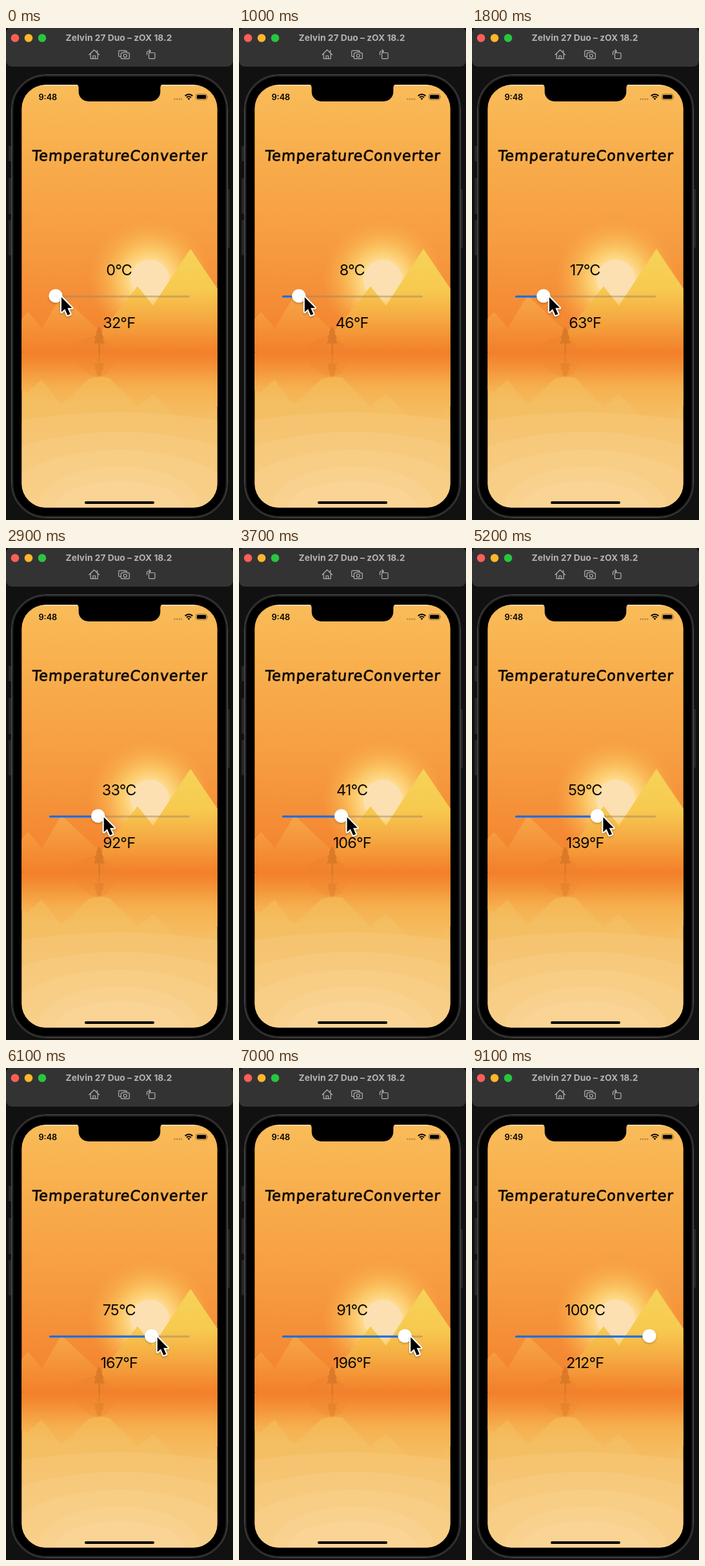
An HTML page for the animation above (9400 ms loop, 352 by 764 pixels).

```html
<!DOCTYPE html>
<html lang="en">
<head>
<meta charset="utf-8">
<title>Temperature converter</title>
<style>
  html, body { margin: 0; width: 100%; height: 100%; overflow: hidden; background: #111; }
  svg { display: block; width: 352px; height: 764px; }
  text { font-family: Inter, Roboto, sans-serif; }
  .window { font-size: 13.8px; font-weight: 700; fill: #b4b3b3; text-anchor: middle; }
  .icon { fill: none; stroke: #b2b1b1; stroke-width: 1.2; stroke-linejoin: round; stroke-linecap: round; }
  .clock { font-size: 12.7px; font-weight: 600; }
  .title { font: 22.3px "DejaVu Sans", sans-serif; letter-spacing: 1px; fill: #100b06; stroke: #100b06; stroke-width: .8; text-anchor: middle; }
  .reading { font-size: 23.5px; letter-spacing: -.9px; text-anchor: middle; fill: #0b0703; }
</style>
</head>
<body>
<svg viewBox="0 0 352 764">
  <defs>
    <linearGradient id="sky" gradientUnits="userSpaceOnUse" x1="0" y1="88" x2="0" y2="506">
      <stop offset="0" stop-color="#f9bc59"/>
      <stop offset=".25" stop-color="#f8ae4c"/>
      <stop offset=".6" stop-color="#f69b41"/>
      <stop offset="1" stop-color="#f3802b"/>
    </linearGradient>
    <linearGradient id="water" gradientUnits="userSpaceOnUse" x1="0" y1="506" x2="0" y2="745">
      <stop offset="0" stop-color="#f3822c"/>
      <stop offset=".16" stop-color="#f5b553"/>
      <stop offset=".32" stop-color="#f4be62"/>
      <stop offset="1" stop-color="#f4c36d"/>
    </linearGradient>
    <linearGradient id="mirror" gradientUnits="userSpaceOnUse" x1="0" y1="505" x2="0" y2="627">
      <stop offset="0" stop-color="#f3802b"/>
      <stop offset=".2" stop-color="#f49439"/>
      <stop offset=".33" stop-color="#f5a546"/>
      <stop offset=".45" stop-color="#f6b150"/>
      <stop offset=".65" stop-color="#f5b95b"/>
      <stop offset="1" stop-color="#f5c067"/>
    </linearGradient>
    <linearGradient id="gold" gradientUnits="userSpaceOnUse" x1="0" y1="343" x2="0" y2="503">
      <stop offset="0" stop-color="#f6d458"/>
      <stop offset=".4" stop-color="#f7c94f"/>
      <stop offset=".65" stop-color="#f5ac43"/>
      <stop offset="1" stop-color="#f3802b"/>
    </linearGradient>
    <linearGradient id="hills" gradientUnits="userSpaceOnUse" x1="0" y1="415" x2="0" y2="503">
      <stop offset="0" stop-color="#f6a648"/>
      <stop offset=".5" stop-color="#f5943a"/>
      <stop offset="1" stop-color="#f3802b"/>
    </linearGradient>
    <radialGradient id="glow">
      <stop offset=".32" stop-color="#fedb8f"/>
      <stop offset=".5" stop-color="#fccd6b" stop-opacity=".88"/>
      <stop offset=".75" stop-color="#fabb56" stop-opacity=".48"/>
      <stop offset="1" stop-color="#f9ae4a" stop-opacity="0"/>
    </radialGradient>
    <clipPath id="screen"><rect x="24.300" y="88.200" width="303.400" height="656.500" rx="37"/></clipPath>
    <filter id="soft" x="-50%" y="-50%" width="200%" height="200%">
      <feDropShadow dx="0" dy="1.5" stdDeviation="1.5" flood-color="#000" flood-opacity=".28"/>
    </filter>
  </defs>

  <!-- simulator window bar -->
  <rect width="352" height="764" fill="#111"/>
  <rect y="-1" width="352" height="61" rx="9" fill="#343333"/>
  <circle cx="14" cy="15.500" r="6.300" fill="#fe5f57"/>
  <circle cx="35" cy="15.500" r="6.300" fill="#fdb62e"/>
  <circle cx="56" cy="15.500" r="6.300" fill="#28c63f"/>
  <text class="window" x="175" y="20.300">Zelvin 27 Duo – zOX 18.2</text>
  <g class="icon">
    <path d="M129 41.500 136.700 34 144.500 41.500M131.200 40v7.600h11V40M135 47.600v-4.600h3.500v4.600M141.500 38v-3.200"/>
    <path d="M178 44.300h-2a1.300 1.300 0 0 1-1.300-1.300v-6.500a1.300 1.300 0 0 1 1.300-1.300h9.800a1.300 1.300 0 0 1 1.300 1.300"/>
    <path d="M179.500 38.600h2l1.200-1.300h4.200l1.200 1.300h2a1.200 1.200 0 0 1 1.200 1.200v6.600a1.200 1.200 0 0 1-1.200 1.200h-10.600a1.200 1.200 0 0 1-1.200-1.200v-6.600a1.200 1.200 0 0 1 1.200-1.200z"/>
    <circle cx="184.800" cy="43" r="2.500"/>
    <rect x="221.500" y="38.500" width="9.500" height="9.200" rx="1.200"/>
    <path d="M218.500 41.500v-3a2.500 2.500 0 0 1 2.500-2.500h3M222 33.800l2.300 2.200-2.300 2.200"/>
  </g>

  <!-- phone body -->
  <g fill="#262626">
    <rect x="4" y="183" width="5" height="24" rx="1"/>
    <rect x="4" y="233" width="5" height="56" rx="1"/>
    <rect x="4" y="298" width="5" height="55" rx="1"/>
    <rect x="343" y="250" width="4" height="91" rx="1"/>
  </g>
  <rect x="8.500" y="72.500" width="335" height="688" rx="53" fill="#000" stroke="#555"/>
  <rect x="10.200" y="74.200" width="331.600" height="684.600" rx="51.500" fill="none" stroke="#2a2a2a" stroke-width="2"/>

  <!-- landscape -->
  <g clip-path="url(#screen)">
    <rect x="24" y="88" width="304" height="419" fill="url(#sky)"/>
    <circle cx="223" cy="390" r="94" fill="url(#glow)"/>
    <circle cx="223" cy="390" r="30" fill="#fde0b1"/>
    <path d="M24 452 34 441 56 466 86 415 140 466 172 503H24z" fill="url(#hills)"/>
    <path d="M120 503 165 450 204 401 228 431 286 343 328 405V506H120z" fill="url(#gold)"/>
    <path d="M104 506 107 494 118 484 140 477 156 486 174 506z" fill="#ef842f" opacity=".55"/>
    <rect x="24" y="505" width="304" height="240" fill="url(#water)"/>
    <path d="M24 505H328V587L286 627 228 568 204 588 160 543 145 541 128 545 103 569 85 585 55 546 34 565 24 562z" fill="url(#mirror)"/>
    <path d="M104 507 112 524 130 538 145 542 157 537 174 507z" fill="#ef842f" opacity=".3"/>
    <g id="rings" fill="#fae3b4" fill-opacity=".14"></g>
    <g id="tree" fill="#da7a28">
      <path d="M144.500 463 150 473H148L152 482H149.500L153 490H136L139.500 482H137L141 473H139z"/>
      <path d="M143.300 489h2.600v18h-2.600z"/>
    </g>
    <use href="#tree" transform="matrix(1 0 0 -.8 0 913)" opacity=".45"/>
    <path d="M48 88.700H114M238 88.700H304" stroke="#fff" stroke-width="1.500" opacity=".85"/>
  </g>
  <path d="M108 87H244Q239.300 88 239.300 93V99A15 15 0 0 1 224.300 114H127.700A15 15 0 0 1 112.700 99V93Q112.700 88 108 87z"/>

  <!-- status bar -->
  <text class="clock" id="clock" x="50.500" y="111.500">9:48</text>
  <path d="M260.500 110.500h13" stroke="#000" stroke-opacity=".32" stroke-width="2.200" stroke-dasharray="2.200 1.300"/>
  <g fill="none" stroke="#000" stroke-width="2">
    <path d="M277.700 105.500a8 8 0 0 1 11.600 0M280 108a5 5 0 0 1 7 0"/>
    <path d="M283.500 111.800l-1.900-2a2.700 2.700 0 0 1 3.800 0z" fill="#000" stroke="none"/>
  </g>
  <rect x="294.600" y="102.700" width="17" height="8.600" rx="2.600" fill="none" stroke="#000" stroke-opacity=".45"/>
  <rect x="296" y="104.100" width="14.200" height="5.800" rx="1.400"/>
  <path d="M312.700 105.500q1.400 1.500 0 3z" fill-opacity=".5"/>

  <!-- app -->
  <text class="title" x="176" y="206" transform="translate(176 206) skewX(-4) translate(-176 -206)">TemperatureConverter</text>
  <text class="reading" id="celsius" x="175.200" y="384">0°C</text>
  <text class="reading" id="fahrenheit" x="175.200" y="466">32°F</text>
  <path d="M68.500 417H283.500" stroke="#a08660" stroke-opacity=".5" stroke-width="3" stroke-linecap="round"/>
  <path id="fill" stroke="#106df0" stroke-width="3.200" stroke-linecap="round"/>
  <circle id="thumb" cy="416" r="10.600" fill="#fff" filter="url(#soft)"/>
  <path id="pointer" d="M0 0V23L5.200 18.300 9.500 28 13.600 26.300 9.400 16.700H16.300z" stroke="#fff" stroke-width="4" paint-order="stroke" stroke-linejoin="round" filter="url(#soft)"/>
  <rect x="122" y="735" width="108" height="4" rx="2"/>
</svg>
<script>
  const LOOP = 9400, STEP = 100;
  const $ = id => document.getElementById(id);

  // [ms, dragged slider value]; the pointer overshoots the end of the track
  const drag = [[0, 0], [300, 0], [1800, 17.1], [2900, 33.2], [3700, 41.2], [3900, 42.3],
    [4000, 42.3], [5000, 55.5], [5200, 59.3], [7000, 91], [7800, 104.7], [LOOP, 104.7]];

  for (const [rx, ry] of [[380, 148], [260, 118], [190, 90], [126, 64], [101, 41]]) {
    const ring = document.createElementNS($('rings').namespaceURI, 'ellipse');
    for (const [k, v] of Object.entries({ cx: 176, cy: 745, rx, ry })) ring.setAttribute(k, v);
    $('rings').append(ring);
  }

  function dragAt(t) {
    const i = drag.findIndex(k => k[0] > t);
    const [t0, a] = drag[i - 1], [t1, b] = drag[i];
    return a + (b - a) * (t - t0) / (t1 - t0);
  }

  const xOf = value => 77 + 1.98 * value;

  function draw(t) {
    const pull = dragAt(t), value = Math.min(100, pull), x = xOf(value);
    $('celsius').textContent = Math.round(value) + '°C';
    $('fahrenheit').textContent = Math.round(value * 1.8 + 32) + '°F';
    $('thumb').setAttribute('cx', x);
    $('fill').setAttribute('d', `M68.5 417H${x}`);
    $('pointer').setAttribute('transform', `translate(${xOf(pull) + 9} 418)`);
    $('pointer').style.display = t < 8400 ? '' : 'none';
    $('clock').textContent = t < 8600 ? '9:48' : '9:49';
  }

  const start = performance.now();
  function tick() {
    const t = (performance.now() - start) % LOOP;
    draw(Math.floor(t / STEP) * STEP);
    requestAnimationFrame(tick);
  }
  tick();
</script>
</body>
</html>
```
